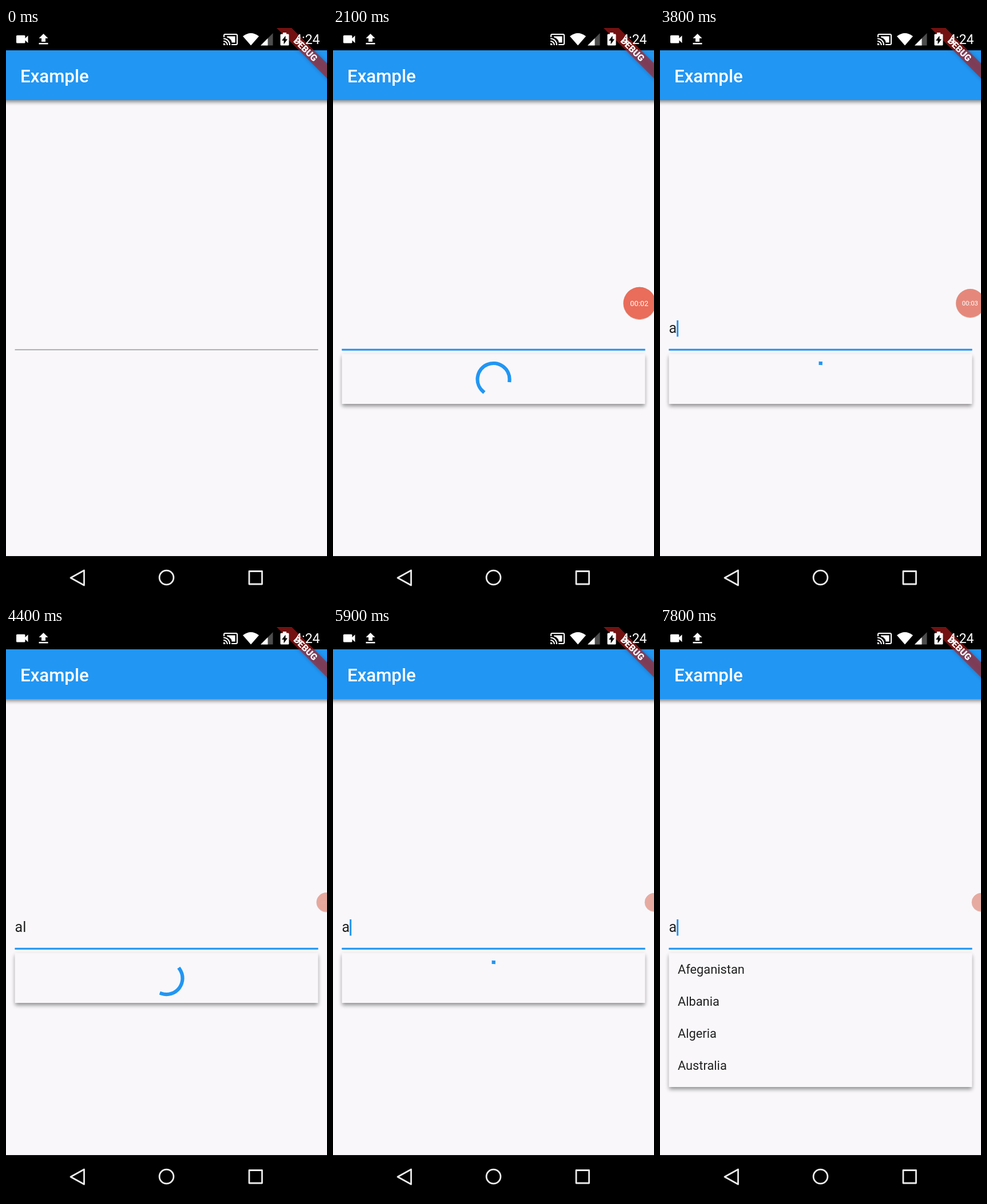
Write an HTML page that moves like this. It is 561 px wide and 998 px high and loops after 8000 ms.

```html
<!DOCTYPE html>
<html lang="en">
<head>
<meta charset="utf-8">
<title>Example</title>
<style>
  html, body { margin: 0; width: 100%; height: 100%; overflow: hidden; background: #000; }
  svg { display: block; width: 100%; height: 100%; font-family: Roboto, sans-serif; }
</style>
</head>
<body>
<svg viewBox="0 0 561 998">
  <defs>
    <filter id="blur" x="-10%" y="-40%" width="120%" height="180%"><feGaussianBlur stdDeviation="3.6"/></filter>
    <clipPath id="stage"><rect width="561" height="998"/></clipPath>
  </defs>
  <g clip-path="url(#stage)">
    <rect width="561" height="998" fill="#f9f7fa"/>
    <rect x="-8" y="60" width="577" height="69" fill="#000" opacity=".5" filter="url(#blur)"/>
    <rect y="39" width="561" height="87" fill="#2196f3"/>
    <rect width="561" height="39"/>
    <text x="25" y="94.5" font-size="31.2" font-weight="500" fill="#fff">Example</text>

    <!-- text field -->
    <text id="typed" x="15.6" y="533" font-size="25" fill="#212121"></text>
    <rect id="cursor" fill="#2196f3" width="3"/>
    <rect x="15.5" y="561.5" width="530" height="1.7" fill="#a29fa3"/>
    <rect id="focus" y="560.7" height="3.1" fill="#2196f3"/>

    <!-- suggestions -->
    <g id="panel">
      <rect id="shade" x="16" y="574" width="529" fill="#000" opacity=".42" filter="url(#blur)"/>
      <rect id="card" x="15.5" y="570" width="530" fill="#f9f7fa"/>
      <path id="spin" fill="none" stroke="#2196f3" stroke-width="6.2" stroke-linecap="square"/>
      <g id="list" font-size="21.8" fill="#212121"></g>
    </g>

    <!-- banner -->
    <g transform="translate(561 0) rotate(45)">
      <rect x="-70" y="43.6" width="140" height="18.7" fill="#000" opacity=".22" filter="url(#blur)"/>
      <rect x="-70" y="43.6" width="140" height="18.7" fill="#b71c1c" opacity=".63"/>
      <text y="58.6" font-size="15.9" font-weight="900" text-anchor="middle" fill="#fff">DEBUG</text>
    </g>

    <!-- status bar -->
    <g fill="#fff">
      <path d="M19.5 12.7H32q1.5 0 1.5 1.5V18l5-4.8v13l-5-4.8v3.6q0 1.5-1.5 1.5H19.5q-1.5 0-1.5-1.5V14.2q0-1.5 1.5-1.5Z"/>
      <path d="M65.500 10l8 8H69v6h-7v-6h-4.500ZM57.500 26h16v2.600h-16Z"/>
      <g fill="none" stroke="#fff" stroke-width="2.1">
        <path d="M381 16v-3q0-2 2-2h19q2 0 2 2v14q0 2-2 2h-8M380 18.500a11 11 0 0 1 11 11.500M380 23a6.800 6.800 0 0 1 6.800 7"/>
        <path d="M386 15.500h13.500v9h-5" />
      </g>
      <path d="M387 15h13v10h-5Q393 18.500 387 16.500ZM380 26.500a3.500 3.500 0 0 1 3.500 3.500H380Z"/>
      <path d="M414 14.500Q428 3.500 442 14.500L428 30.500Z"/>
      <path d="M466.500 9v21.500H445Z" fill="#4d4d4d"/>
      <path d="M457.500 18v12.500H445Z"/>
      <path d="M484 8h6v2.500h3q1.500 0 1.500 1.500v17q0 1.500-1.500 1.500h-12q-1.500 0-1.500-1.500V12q0-1.500 1.500-1.500h3Z"/>
      <path d="M488.500 13.500v6h3.500l-6.500 9v-6.500H482Z" fill="#000"/>
      <text x="548.500" y="28" font-size="23" text-anchor="end">4:24</text>
    </g>

    <!-- recorder bubble -->
    <g id="bubble">
      <circle id="halo" fill="none" stroke="#b9a9a6" stroke-width="1" opacity=".6"/>
      <circle id="disc"/>
      <text id="clock" fill="#fff" text-anchor="middle"></text>
    </g>

    <!-- navigation bar -->
    <rect y="923" width="561" height="75"/>
    <g fill="none" stroke="#ececec" stroke-width="2.8" stroke-linejoin="round">
      <path d="M136.500 948v26L113 961Z"/>
      <circle cx="280.500" cy="960.500" r="12.400"/>
      <rect x="425" y="949.500" width="22.500" height="22.500"/>
    </g>
  </g>
</svg>
<script>
const LOOP = 8000, PI = Math.PI;
const $ = id => document.getElementById(id);
const set = (id, attrs) => { for (const k in attrs) $(id).setAttribute(k, attrs[k]); };
const show = (id, on) => set(id, { visibility: on ? 'inherit' : 'hidden' });
const text = (el, s) => { if (el.textContent !== s) el.textContent = s; };
const clamp = x => Math.min(1, Math.max(0, x));
const mix = (a, b, p) => a + (b - a) * p;
const within = (t, a, b) => t >= a && t < b;

const ALL = ['Afeganistan', 'Albania', 'Algeria', 'Australia'];
const MATCH = ['Albania', 'Algeria', 'Australia', 'Portugal'];

// Each query: time typed, spinner start, results shown
const QUERIES = [
  { at: 1300, spin: 1500, done: 2500, typed: '', items: ALL, height: 234 },
  { at: 3800, spin: 3800, done: 9999, typed: 'a' },
  { at: 4220, spin: 4220, done: 5200, typed: 'al', items: MATCH, height: 224 },
  { at: 5900, spin: 5900, done: 7000, typed: 'a', items: ALL, height: 234 }
];
const CURSOR_OFF = [[0, 1300], [1700, 2200], [2700, 3100], [4400, 4900], [5400, 5900], [6400, 6900], [7500, 7800]];
const CURSOR_X = { '': 15.5, a: 29.2, al: 35.2 };

const rows = ALL.map((_, i) => {
  const el = document.createElementNS('http://www.w3.org/2000/svg', 'text');
  el.setAttribute('x', 31);
  el.setAttribute('y', 606 + 56.1 * i);
  return $('list').appendChild(el);
});

// cubic-bezier(.4, 0, .2, 1)
function ease(x) {
  x = clamp(x);
  let lo = 0, hi = 1, u = x;
  for (let i = 0; i < 24; i++) {
    u = (lo + hi) / 2;
    const bx = 1.2 * u * (1 - u) ** 2 + 0.6 * u * u * (1 - u) + u ** 3;
    if (bx < x) lo = u; else hi = u;
  }
  return 3 * u * u * (1 - u) + u ** 3;
}

function arc(ms) {
  const step = Math.floor(ms / 1000), p = ms / 1000 - step;
  const head = ease(p * 2) * 1.5 * PI, tail = ease(p * 2 - 1) * 1.5 * PI;
  const a = -PI / 2 + tail + p * 1.7 * PI - step * 0.8 * PI;
  const sweep = Math.max(head - tail, 0.003);
  const pt = q => `${(280.5 + 28 * Math.cos(q)).toFixed(3)} ${(614 + 28 * Math.sin(q)).toFixed(3)}`;
  return `M${pt(a)}A28 28 0 ${sweep > PI ? 1 : 0} 1 ${pt(a + sweep)}`;
}

function drawField(t, query) {
  const typed = query ? query.typed : '';
  text($('typed'), typed);
  set('cursor', { x: CURSOR_X[typed], y: typed ? 511 : 513.5, height: typed ? 28.5 : 23 });
  show('cursor', !CURSOR_OFF.some(([a, b]) => within(t, a, b)));
  const w = 530 * ease((t - 1600) / 200);
  set('focus', { x: 280.5 - w / 2, width: w });
}

function drawPanel(t, query) {
  show('panel', query);
  if (!query) return;
  const ready = t >= query.done, height = ready ? query.height : 87;
  set('card', { height });
  set('shade', { height });
  show('spin', !ready);
  show('list', ready);
  if (ready) rows.forEach((el, i) => text(el, query.items[i]));
  else set('spin', { d: arc(Math.max(0, t - query.spin)) });
}

function drawBubble(t) {
  show('bubble', t >= 100);
  const enter = ease((t - 50) / 250), small = ease((t - 2000) / 300), dock = ease((t - 4200) / 300);
  const stage = (a, b, c) => mix(mix(a, b, small), c, dock);
  const cx = stage(530, 542.3, 561) + 62 * (1 - enter), r = stage(31, 25, 16);
  const rgb = [stage(236, 229, 231), stage(85, 136, 170), stage(62, 123, 160)].map(Math.round);
  set('disc', { cx, cy: 481, r, fill: `rgb(${rgb})` });
  set('halo', { cx, cy: 481.4, r });
  set('clock', { x: cx - 0.5, y: 481 + r * 0.165, 'font-size': r * 0.452, opacity: 1 - dock });
  text($('clock'), '00:0' + Math.max(0, Math.floor((t - 100) / 1000)));
}

function draw(t) {
  const query = QUERIES.filter(q => t >= q.at).pop();
  drawField(t, query);
  drawPanel(t, query);
  drawBubble(t);
}

const start = performance.now();
function tick() {
  draw((performance.now() - start) % LOOP);
  requestAnimationFrame(tick);
}
tick();
</script>
</body>
</html>
```
